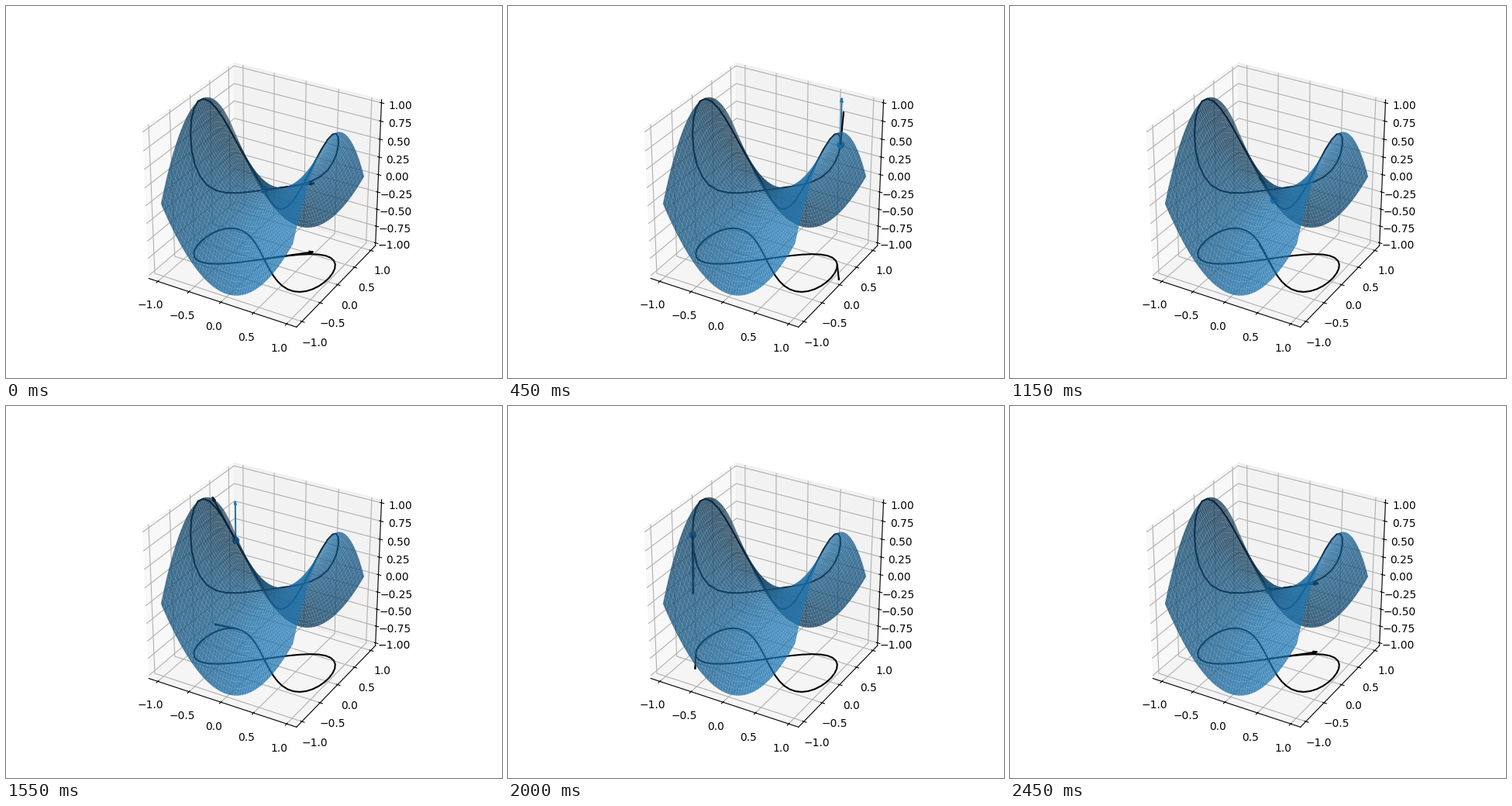
A matplotlib script that plays this animation: 640 px wide and 480 px high, repeating every 2.5 s.

```python
import numpy as np
import matplotlib.pyplot as plt
from matplotlib.animation import FuncAnimation

FRAMES = 50
SCALE = 0.5      # arrow length relative to the velocity
FLOOR = -1
MARGIN = 25 / 24


def saddle(x, y):
    return x**2 - y**2


def position(t):
    x, y = np.sin(t), np.sin(t) * np.cos(t)
    return x, y, saddle(x, y)


def velocity(t):
    x, y, _ = position(t)
    dx, dy = np.cos(t), np.cos(2 * t)
    return dx, dy, 2 * x * dx - 2 * y * dy


fig = plt.figure(figsize=(6.4, 4.8), dpi=100)
ax = fig.add_subplot(projection="3d")
ax.set_box_aspect((1, 1, 1))

grid = np.linspace(-1, 1, 50)
gx, gy = np.meshgrid(grid, grid)
ax.plot_surface(gx, gy, saddle(gx, gy), color="C0", alpha=0.8)

times = np.linspace(0, 2 * np.pi, FRAMES)
px, py, pz = position(times)
ax.plot(px, py, pz, color="k")
ax.plot(px, py, np.full(FRAMES, FLOOR), color="k")
dot, = ax.plot([0], [0], [0], "o", color="C0")

xy_lim, z_lim = 1.1 * MARGIN, MARGIN
ax.set(xlim=(-xy_lim, xy_lim), ylim=(-xy_lim, xy_lim), zlim=(-z_lim, z_lim))
ax.set_xticks(np.linspace(-1, 1, 5))
ax.set_yticks(np.linspace(-1, 1, 5))
ax.set_zticks(np.linspace(-1, 1, 9))

arrows = []


def add_arrow(start, step, color):
    if np.linalg.norm(step) > 1e-6:
        arrows.append(ax.quiver(*start, *step, length=SCALE, color=color,
                                arrow_length_ratio=0.1))


def update(frame):
    while arrows:
        arrows.pop().remove()
    t = times[frame]
    x, y, z = position(t)
    dx, dy, dz = velocity(t)
    dot.set_data_3d([x], [y], [z])
    add_arrow((x, y, FLOOR), (dx, dy, 0), "k")
    add_arrow((x, y, z), (0, 0, dz), "C0")
    add_arrow((x, y, z), (dx, dy, dz), "k")
    return [dot, *arrows]


anim = FuncAnimation(fig, update, frames=FRAMES, interval=50, repeat=True,
                     repeat_delay=0, init_func=lambda: [dot])
plt.show()
```
